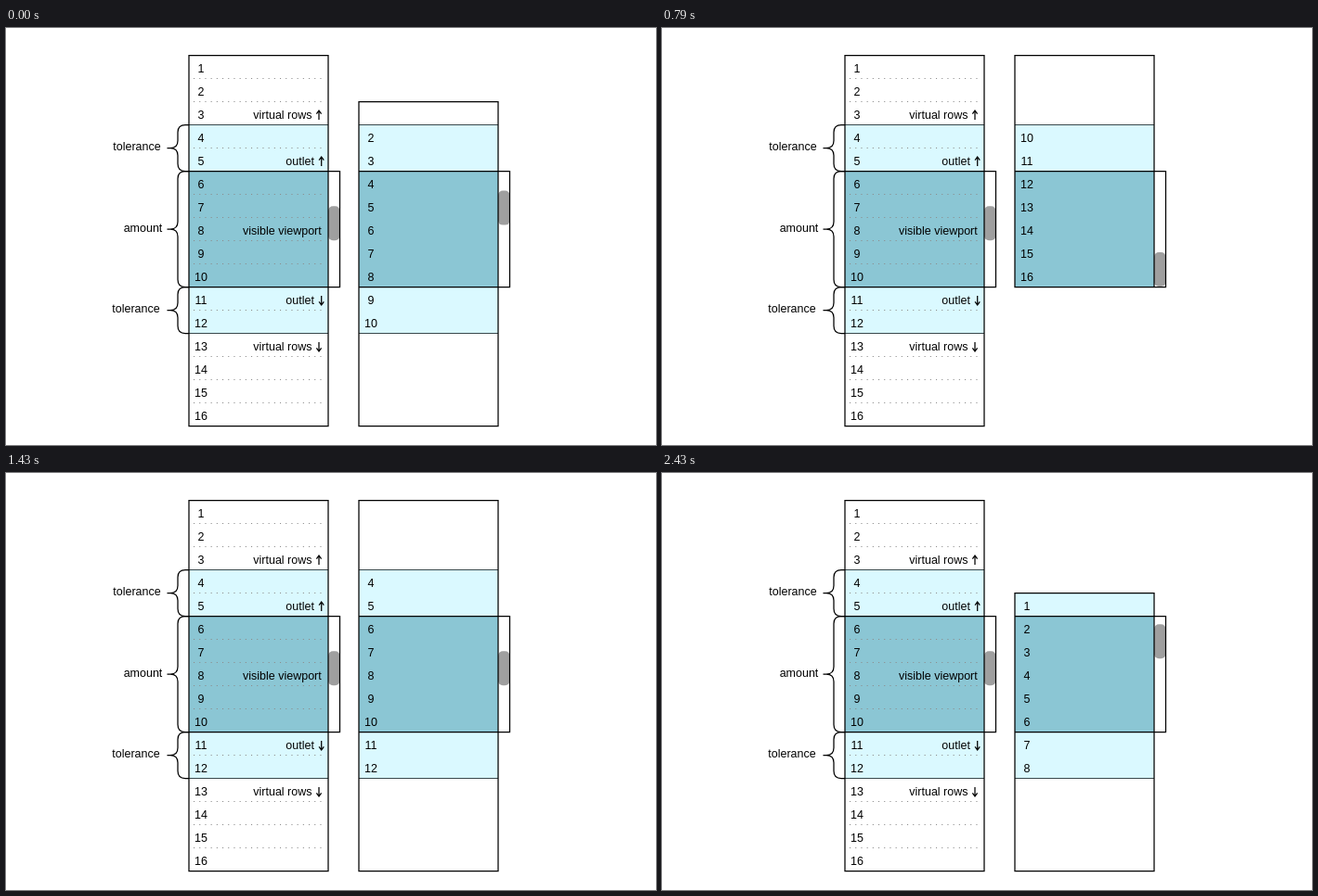
An HTML page for the animation above (2.45 s loop, 700 px wide and 450 px high).

```html
<!DOCTYPE html>
<html lang="en">
<head>
<meta charset="utf-8">
<title>Virtual scrolling</title>
<style>
  html, body { margin: 0; width: 100%; height: 100%; overflow: hidden; background: #fff; }
  svg { display: block; width: 700px; height: 450px; }
  text { font: 12.5px "Liberation Sans", Arial, sans-serif; fill: #000; }
  .mid { text-anchor: middle; }
  .line { fill: none; stroke: #000; stroke-width: 1.25; }
  .edge { fill: none; stroke: #38484c; stroke-width: 1; }
  .dots { stroke: #8c8c8c; stroke-width: 1.1; stroke-dasharray: 1.1 5.1; }
  .light { fill: #daf9ff; }
  .dark { fill: #8bc6d4; }
  .thumb { fill: #9f9f9f; }
</style>
</head>
<body>
<svg viewBox="0 0 700 450"><g id="left"></g><g id="right"></g></svg>
<script>
const ROW = 25, TOP = 29.5, BOTTOM = 429.5, ROWS = 16, VISIBLE = 5;
const VIEW_TOP = 154.5, VIEW_BOTTOM = 279.5, OUT_TOP = 104.5, OUT_BOTTOM = 329.5;
const LOOP = 2450;

// [start time in ms, first visible row]
const STEPS = [
  [0, 4], [130, 5], [270, 6], [400, 8], [520, 9], [670, 10], [790, 12],
  [1070, 10], [1190, 9], [1310, 8], [1430, 6], [1550, 5], [1700, 4],
  [1850, 2], [2000, 1], [2430, 2]
];

function add(parent, tag, attrs, label) {
  const el = document.createElementNS("http://www.w3.org/2000/svg", tag);
  for (const key in attrs) el.setAttribute(key, attrs[key]);
  if (label !== undefined) el.textContent = label;
  parent.append(el);
  return el;
}

const baseline = slot => 48.4 + slot * ROW;

function thumbTop(first) {
  if (first === 1) return 154.5;
  if (first === 2) return 163.2;
  return 192.2 + (first - 6) * 8.3;
}

function column(parent, x) {
  const block = cls => add(parent, "rect", { class: cls, x, width: 150 });
  const light = block("light");
  const dark = block("dark");
  const thumb = add(parent, "rect", { class: "thumb", x: x, width: 12.5, height: 37, rx: 5 });
  thumb.setAttribute("x", x + 150);
  const dots = add(parent, "g", {});
  const edges = add(parent, "path", { class: "edge" });
  const frame = add(parent, "path", { class: "line" });
  const labels = add(parent, "g", {});
  const slots = Array.from({ length: ROWS }, (_, i) =>
    add(labels, "text", { class: "mid", x: x + 13, y: baseline(i) }));

  function span(rect, y1, y2) {
    rect.setAttribute("y", y1);
    rect.setAttribute("height", Math.max(0, y2 - y1));
  }

  function show(first, all) {
    const top = Math.max(TOP, VIEW_TOP - (first - 1) * ROW);
    const bottom = Math.min(BOTTOM, VIEW_BOTTOM + (ROWS - VISIBLE + 1 - first) * ROW);
    const outTop = Math.max(top, OUT_TOP), outBottom = Math.min(bottom, OUT_BOTTOM);
    span(light, outTop, outBottom);
    span(dark, VIEW_TOP, VIEW_BOTTOM);
    thumb.setAttribute("y", thumbTop(first));
    edges.setAttribute("d", `M${x} ${outTop}h150M${x} ${outBottom}h150`);
    frame.setAttribute("d",
      `M${x} ${top}h150V${bottom}h-150z` +
      `M${x} ${VIEW_TOP}h162.5V${VIEW_BOTTOM}H${x}`);
    slots.forEach((slot, i) => {
      const row = i - 5 + first;
      const inside = i >= 3 && i < 12 && row >= 1 && row <= ROWS;
      slot.textContent = all || inside ? row : "";
    });
  }
  return { show, dots };
}

function brace(y1, y2) {
  const mid = (y1 + y2) / 2, r = 8;
  add(left, "path", {
    class: "line",
    d: `M197 ${y1}H193Q185 ${y1} 185 ${y1 + r}V${mid - r}Q185 ${mid} 177 ${mid}H173.5` +
       `H177Q185 ${mid} 185 ${mid + r}V${y2 - r}Q185 ${y2} 193 ${y2}H197`
  });
}

function arrow(x, slot, dir) {
  const mid = baseline(slot) - 4.4, tip = mid - dir * 5, neck = tip + dir * 3.6;
  add(left, "path", {
    class: "line", "stroke-width": 1.1,
    d: `M${x} ${mid + dir * 5}V${tip}M${x - 2.6} ${neck}L${x} ${tip}L${x + 2.6} ${neck}`
  });
}

const left = document.getElementById("left");
const guide = column(left, 197);
guide.show(6, true);
for (let i = 1; i < ROWS; i++) {
  if ([3, 5, 10, 12].includes(i)) continue;
  const y = TOP + i * ROW;
  add(guide.dots, "line", { class: "dots", x1: 202, x2: 343, y1: y, y2: y });
}

[[104.5, 154.5], [154.5, 279.5], [279.5, 329.5]].forEach(([a, b]) => brace(a, b));
[["tolerance", 141, 132], ["amount", 147.5, 220.3], ["tolerance", 140, 307]].forEach(
  ([word, x, y]) => add(left, "text", { class: "mid", x, y }, word));
[["virtual rows", 266.3, 2], ["outlet", 301.3, 4], ["visible viewport", 255, 7],
 ["outlet", 301.3, 10], ["virtual rows", 266.3, 12]].forEach(
  ([word, x, slot]) => add(left, "text", { x, y: baseline(slot) }, word));
arrow(337, 2, 1);
arrow(339.7, 4, 1);
arrow(339.7, 10, -1);
arrow(337, 12, -1);

const list = column(document.getElementById("right"), 380);
const start = performance.now();
let current = 0;

function draw() {
  const t = (performance.now() - start) % LOOP;
  const first = STEPS.findLast(step => step[0] <= t)[1];
  if (first !== current) list.show(current = first, false);
  requestAnimationFrame(draw);
}
draw();
</script>
</body>
</html>
```
